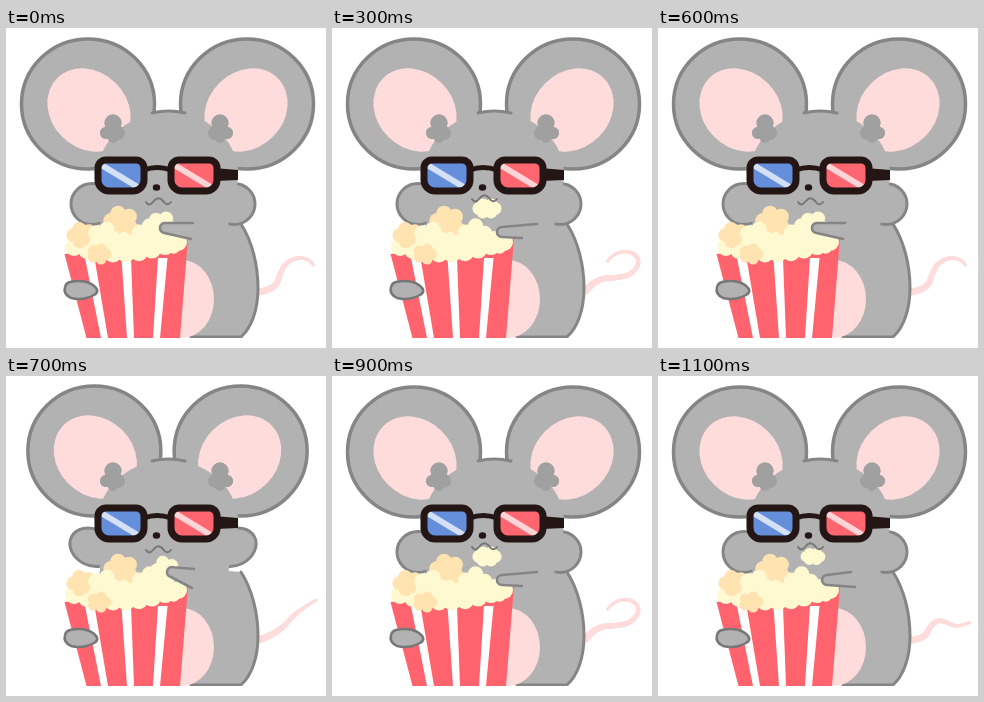
An HTML page with a canvas that plays this animation: 320x320 px, repeating every 1.2 s.

```html
<!DOCTYPE html>
<html lang="en">
<head>
<meta charset="utf-8">
<title>Mouse at the movies</title>
<style>
html, body { margin: 0; width: 100%; height: 100%; overflow: hidden; background: #fff; }
canvas { display: block; width: 320px; height: 320px; }
</style>
</head>
<body>
<canvas id="stage"></canvas>
<script>
const canvas = document.getElementById('stage');
const ctx = canvas.getContext('2d');
const dpr = window.devicePixelRatio || 1;
canvas.width = canvas.height = 320 * dpr;

const GRAY = '#b2b2b2', TUFT = '#a0a0a0', LINE = '#858585', PINK = '#ffdcdc', RED = '#ff636e';
const CREAM = '#fff9d2', TAN = '#ffe3b0', BLACK = '#241614';
const STEP = 100, MID = 161.5;

// lean: how far the ears tip inward; hand: tip centre; wrist: its two ends;
// tail: length, then headings in degrees from root to tip.
const poses = [
  { lean: 0, hand: [159, 200], wrist: [187, 195, 185, 211], tail: [73, -10, -25, -75, -60, -25, 10, 60] },
  { lean: .67, hand: [166, 196], wrist: [188, 193, 186, 212], kernel: [159, 194], tail: [70, -20, -30, -50, -35, -30] },
  { lean: 1, hand: [168, 190], wrist: [187, 191, 186, 212], kernel: [158, 187], tail: [70, -35, -30, -25, 0, -30, -70] },
  { lean: 0, hand: [170, 204], wrist: [205, 196, 190, 210], crumb: 1, tail: [105, -55, -30, 0, -15, -60, -150, -200, -235] },
  { lean: .67, hand: [172, 209], wrist: [203, 197, 190, 214], crumb: 1, kernel: [159, 201], tail: [73, -45, -25, 10, -25, -80, -125] },
  { lean: 0, hand: [169, 204], wrist: [193, 196, 197, 211], crumb: .85, tail: [68, -5, -20, -65, -45, 15, 25, -15, -20] }
];

const mix = (a, b, k) => a + (b - a) * k;

function paint(path, fill, stroke, width = 3) {
  if (fill) { ctx.fillStyle = fill; ctx.fill(path); }
  if (stroke) { ctx.strokeStyle = stroke; ctx.lineWidth = width; ctx.stroke(path); }
}

const shape = (d, ...style) => paint(new Path2D(d), ...style);

function oval(x, y, rx, ry, turn, ...style) {
  const path = new Path2D();
  path.ellipse(x, y, rx, ry, turn, 0, Math.PI * 2);
  paint(path, ...style);
}

const dot = (x, y, r, fill) => oval(x, y, r, r, 0, fill);

// A fluffy clump: a ring of dots around a centre.
function puff(x, y, r, fill, flat = 1, petals = 5) {
  oval(x, y, r * .7, r * .7 * flat, 0, fill);
  for (let i = 0; i < petals; i++) {
    const a = i / petals * Math.PI * 2 + x;
    dot(x + Math.cos(a) * r * .58, y + Math.sin(a) * r * .58 * flat, r * .46, fill);
  }
}

// Follow the headings from the root, thinning toward the tip.
function tail([length, ...turns]) {
  const n = turns.length - 1, steps = 120;
  let x = 253, y = 264;
  for (let s = 0; s < steps; s++) {
    const u = s / steps * n, i = Math.floor(u);
    const a = mix(turns[i], turns[i + 1], u - i) * Math.PI / 180;
    x += Math.cos(a) * length / steps;
    y += Math.sin(a) * length / steps;
    dot(x, y, mix(3.4, 1.5, s / steps), PINK);
  }
}

function ear(side, k) {
  const x = MID + side * mix(79.5, 70, k), y = mix(76, 74.5, k);
  oval(x, y, 66.5, 65, 0, GRAY, LINE, 3.5);
  oval(x - side, y + 6, 45, 38, -side * Math.PI / 4, PINK);
}

function tuft(side) {
  const x = 160.5 + side * 53.5;
  dot(x, 95, 8.5, TUFT);
  dot(x + side * 7, 105, 6, TUFT);
  dot(x - side * 5, 105, 7, TUFT);
  dot(x, 110, 5, TUFT);
}

function cheek(side, k) {
  oval(157 + side * 71, mix(176, 169, k), mix(21, 24, k), mix(20.5, 17, k), -side * .7 * k, GRAY, LINE);
}

function body() {
  shape('M95 185L235 196C246 213 252 237 252 260C252 283 245 300 235 309L80 309Z', GRAY);
  shape('M235 196C246 213 252 237 252 260C252 283 245 300 235 309L185 309', null, LINE);
  oval(176, 271, 32, 39, 0, PINK);
  ctx.fillStyle = '#fff';
  ctx.fillRect(60, 310, 200, 10);
}

function head(k) {
  cheek(-1, k);
  cheek(1, k);
  oval(162, 146, 70, 62, 0, GRAY);
  shape('M88 138L230 138L222 200L95 200Z', GRAY);
  shape('M146 85Q162 81 179 85', null, LINE);
}

function lens(x, color) {
  const rim = new Path2D();
  rim.roundRect(x, 132, 46, 31, [8, 8, 11, 11]);
  paint(rim, color);
  shape(`M${x + 5} 138L${x + 38} 158`, null, 'rgba(255,255,255,.72)', 6);
  paint(rim, null, BLACK, 7);
}

function glasses() {
  shape('M208 140L232 142L232 152L210 153Z', BLACK);
  lens(92, '#658fdb');
  lens(165, '#ff6670');
  shape('M138 142Q151 137 165 142', null, BLACK, 5);
}

function bucket() {
  shape('M58.5 226L182 210L174 310L80.5 310Z', RED);
  for (let i = 0; i < 3; i++) {
    const top = 79 + i * 36.5, low = 95 + i * 26;
    shape(`M${top} 230h9.5L${low + 7} 310h-7Z`, '#fff');
  }
}

function popcorn(full) {
  if (full) puff(156, 198, 15, CREAM);
  for (let i = 0; i < 9; i++) {
    const u = i / 8;
    dot(mix(68, 172, u), 219 + 9 * Math.sin(Math.PI * u) - 5 * u, 9, CREAM);
  }
  puff(115, 193, 17, TAN, .8);
  puff(76, 207, 15, TAN, .75);
  puff(127, 209, 13, TAN);
  puff(98, 211, 17, CREAM);
  puff(143, 208, 17, CREAM);
  puff(120, 217, 13, CREAM);
  puff(163, 215, 13, CREAM, .8);
  puff(93, 226, 12, TAN, .75);
}

function hand([x, y], [x1, y1, x2, y2]) {
  const a = Math.atan2((y1 + y2) / 2 - y, (x1 + x2) / 2 - x);
  const path = new Path2D();
  path.moveTo(x1, y1);
  path.arc(x, y, 5, a - Math.PI / 2, a + Math.PI / 2, true);
  path.lineTo(x2, y2);
  paint(path, GRAY, LINE, 2.6);
}

function face(pose) {
  if (pose.crumb) puff(155, 180.5, 14 * pose.crumb, CREAM, .5, 6);
  if (pose.lean === 1) {
    oval(152, 174, 8, 6.5, 0, '#ff747d');
  } else {
    const y = pose.crumb ? 171 : 174;
    shape(`M140 ${y}q3 5 7 0q5-7 10-1q4 6 8 1`, null, '#777', 2);
  }
  oval(150.5, 159.5, 3.7, 3.3, 0, BLACK);
}

function draw(pose) {
  const k = pose.lean;
  ctx.setTransform(dpr, 0, 0, dpr, 0, 0);
  ctx.fillStyle = '#fff';
  ctx.fillRect(0, 0, 320, 320);
  ctx.lineCap = ctx.lineJoin = 'round';

  tail(pose.tail);
  ear(-1, k);
  ear(1, k);
  body();
  tuft(-1);
  tuft(1);
  head(k);
  tuft(-1);
  tuft(1);
  glasses();
  face(pose);
  bucket();
  popcorn(!pose.crumb && !pose.kernel);
  if (pose.kernel) puff(...pose.kernel, 14, CREAM);
  hand(pose.hand, pose.wrist);
  shape('M64 254Q78 251 87 257Q95 263 88 267Q77 273 65 270Q57 266 59 259Q60 255 64 254Z', GRAY, '#777', 2.5);
}

const start = performance.now();
let shown = -1;
function tick() {
  const i = Math.floor(Math.max(0, performance.now() - start) / STEP) % poses.length;
  if (i !== shown) draw(poses[shown = i]);
  requestAnimationFrame(tick);
}
tick();
</script>
</body>
</html>
```
